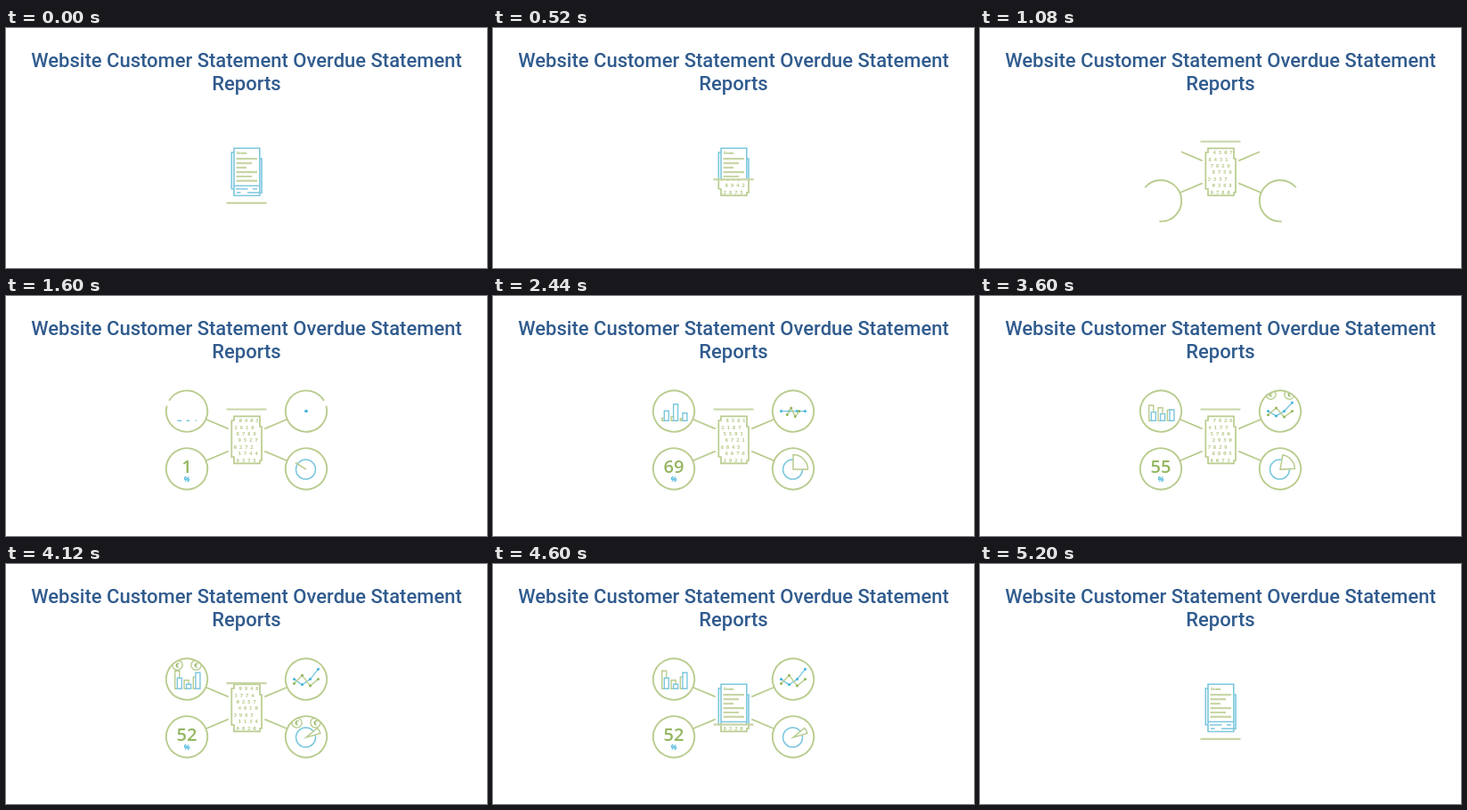
An HTML page with a canvas for the animation above (5.8 s loop, 540 by 270 pixels).

```html
<!DOCTYPE html>
<html lang="en">
<head>
<meta charset="utf-8">
<title>Overdue statement reports</title>
<style>
  html, body { margin: 0; width: 100%; height: 100%; overflow: hidden; background: #fff; }
  h1 {
    position: absolute; left: 0; top: 24px; width: 540px; margin: 0;
    font: 500 22px/26px Roboto, sans-serif; color: #305b8e;
    text-align: center; white-space: nowrap;
  }
  canvas { position: absolute; left: 0; top: 0; width: 540px; height: 270px; }
</style>
</head>
<body>
<canvas id="stage"></canvas>
<h1>Website Customer Statement Overdue Statement<br>Reports</h1>
<script>
const LOOP = 5800, STEP = 40, TAU = Math.PI * 2, RADIUS = 23.2;
const GREEN = '#b9cc8e', PALE = '#c8d6a6', LEAF = '#94b660', BLUE = '#7cc7de', DOT = '#45b4dc';
const canvas = document.getElementById('stage');
const ctx = canvas.getContext('2d');
const dpr = window.devicePixelRatio || 1;
canvas.width = 540 * dpr;
canvas.height = 270 * dpr;

// Timing helpers
const span = (t, from, to) => Math.min(1, Math.max(0, (t - from) / (to - from)));
const move = (t, from, to) => (1 - Math.cos(Math.PI * span(t, from, to))) / 2;
const easeOut = u => Math.sin(u * Math.PI / 2);
const mix = (a, b, u) => a + (b - a) * u;

function random(seed) {
  const v = Math.sin(seed * 12.9898) * 43758.5453;
  return v - Math.floor(v);
}

// Drawing helpers
function paint(color, width, fill) {
  if (fill) { ctx.fillStyle = fill; ctx.fill(); }
  ctx.strokeStyle = color;
  ctx.lineWidth = width;
  ctx.stroke();
}
function path(points, color, width, close, fill) {
  ctx.beginPath();
  points.forEach(([x, y]) => ctx.lineTo(x, y));
  if (close) ctx.closePath();
  paint(color, width, fill);
}
const hline = (x1, x2, y, color, width) => path([[x1, y], [x2, y]], color, width);

function ring(x, y, r, color, width, fill, from = 0, to = TAU) {
  ctx.beginPath();
  ctx.arc(x, y, r, from, to);
  paint(color, width, fill);
}
function label(text, x, y, font, color) {
  ctx.font = font;
  ctx.fillStyle = color;
  ctx.textAlign = 'center';
  ctx.fillText(text, x, y);
}
function band(top, bottom, draw) {
  ctx.save();
  ctx.beginPath();
  ctx.rect(240, top, 60, bottom - top);
  ctx.clip();
  draw();
  ctx.restore();
}

// Document as paper
function paper() {
  path([[256, 140], [253.3, 140], [253.3, 181], [256, 181]], BLUE, 1.6);
  path([[285, 147], [287, 147], [287, 185.5], [285, 185.5]], BLUE, 1.6);
  path([[256, 135.2], [284.8, 135.2], [284.8, 188.5], [256, 188.5]], BLUE, 1.6, true, '#fff');
  label('Details', 264.8, 142, '700 3.6px Roboto, sans-serif', LEAF);
  for (let i = 0; i < 6; i++) hline(258.5, 282 - 6 * (i % 5 % 3), 147.2 + i * 4.95, PALE, 2.2);
  hline(256, 285, 177.6, BLUE, 1.5);
  hline(258, 271.5, 181, BLUE, 1.6);
  hline(277, 282, 181, BLUE, 1.6);
  hline(259, 263.5, 185.2, BLUE, 1.6);
  hline(271, 285, 185.2, BLUE, 1.6);
}

// Document as data
function data(t) {
  const tick = Math.floor(t / 80);
  path([[256, 135.3], [285, 135.3], [285, 147], [287, 147], [287, 185], [285, 185],
    [285, 188.3], [256, 188.3], [256, 181], [253.3, 181], [253.3, 140], [256, 140]], GREEN, 1.7, true);
  for (let row = 0; row < 7; row++) {
    const x = 260.3 - 3 * Math.cos(2.35 * (row - 4));
    for (let col = 0; col < 4; col++) {
      label(Math.floor(10 * random(tick * 31 + row * 4 + col + 1)), x + col * 6.2, 142.2 + row * 7.4,
        '700 6px "Noto Sans Mono", monospace', GREEN);
    }
  }
}

// Bubble contents, drawn around the bubble centre
const BARS = { blue: [11, 18.5, 8.5], green: [14, 21, 11], blueEnd: [12, 5, 18], greenEnd: [20, 9.5, 13] };

function bars(t) {
  const swap = move(t, 3040, 4080);
  const rise = move(t, 1660, 2440) * (1 - 0.4 * move(t, 2440, 3040));
  const bar = (x, w, h, color) =>
    path([[x, 10.7], [x, 10.7 - h], [x + w, 10.7 - h], [x + w, 10.7]], color, 1.4, true, '#fff');
  for (let i = 0; i < 3; i++) {
    const x = -13.3 + i * 10.3;
    const green = mix(BARS.green[i] * move(t, 2200, 3000), BARS.greenEnd[i], swap);
    const width = 5 * span(t, 1440 + i * 60, 1560 + i * 80);
    if (green > 0) bar(x, 5, green, GREEN);
    if (width > 0) bar(x + 2.6, width, mix(BARS.blue[i] * rise, BARS.blueEnd[i], swap), BLUE);
  }
}

function lines(t) {
  const stretch = 1 + 0.25 * move(t, 3400, 4000);
  const plot = (heights, spread, lift, color, mark) => {
    const points = heights.map((y, i) => [(i * 9 - 13.5) * spread, y * lift * stretch]);
    path(points, color, 1.4);
    points.forEach(([x, y]) => ring(x, y, 0.9, mark, 1.2, mark));
  };
  if (t >= 1480) plot([0, 5, 0, -9], move(t, 1640, 2320), move(t, 2440, 2960), BLUE, DOT);
  if (t >= 2160) plot([4, -3.5, 6, 0], move(t, 2200, 2680), move(t, 2160, 2440), GREEN, LEAF);
}

function percent(t) {
  if (t < 1480) return;
  const value = 73 * span(t, 1588, 2490) - 21 * span(t, 3080, 3680);
  label(Math.round(value), 0, 4.6, '600 20px "Open Sans", sans-serif', LEAF);
  label('%', 0, 14.3, 'italic 700 8px "Open Sans", sans-serif', DOT);
}

function pie(t) {
  const size = easeOut(span(t, 1320, 1560));
  if (!size) return;
  ring(-0.5, 0.7, 11 * size, BLUE, 1.5);
  if (t < 1400) return;
  const sweep = easeOut(span(t, 1360, 1960)), swap = move(t, 3400, 4080);
  const from = -140 * (1 - sweep) + 50 * swap;
  const to = from + 90 * move(t, 1960, 2400) - 66 * swap;
  const rad = degrees => (degrees - 90) * Math.PI / 180;
  ctx.beginPath();
  ctx.moveTo(0, 0.7);
  ctx.arc(0, 0.7, 11 + 5.5 * sweep, rad(from), rad(to));
  ctx.closePath();
  paint(GREEN, 1.5, '#fff');
}

function coins(t, start) {
  const u = span(t, start, start + 700);
  if (u <= 0 || u >= 1) return;
  ctx.save();
  ctx.beginPath();
  ctx.arc(0, 0, RADIUS, 0, TAU);
  ctx.clip();
  for (const side of [-1, 1]) {
    ctx.save();
    ctx.translate(side * 10.5, -30 + 60 * u * u);
    ctx.rotate(0.2);
    ring(0, 0, 5.6, GREEN, 1.4, '#fff');
    label('€', 0, 2.7, '700 7.5px "Open Sans", sans-serif', LEAF);
    ctx.restore();
  }
  ctx.restore();
}

// side: -1 left, 1 right; level: -1 top, 1 bottom
const BUBBLES = [
  { draw: bars, side: -1, level: -1, coin: 3780, leave: 4640 },
  { draw: lines, side: 1, level: -1, coin: 3300, leave: 4800 },
  { draw: percent, side: -1, level: 1, coin: 2820, leave: 4800 },
  { draw: pie, side: 1, level: 1, coin: 3780, leave: 4800 }
];

function bubble({ draw, side, level, coin, leave }, t) {
  const start = 800 - 120 * level, linked = start + 170, closed = start + 740 - 60 * level;
  const x = 270 + side * 67, y = 162 + level * 32.4;
  const inner = [270 + side * 20.3, 162 + level * 12.6];
  const outer = [270 + side * 45.5, 162 + level * 23.3];

  const reach = span(t, start, linked) * (1 - span(t, leave + 160, leave + 380));
  if (reach > 0) path([inner, inner.map((v, i) => mix(v, outer[i], reach))], GREEN, 1.7);

  const drawn = easeOut(span(t, linked, closed));
  const u = span(t, leave, leave + 400);
  const scale = 1 + 3.8 * u * u - 4.8 * u * u * u;
  if (!drawn || scale < 0.01) return;
  ctx.save();
  ctx.translate(x, y);
  ctx.scale(scale, scale);
  draw(t);
  coins(t, coin);
  const mid = Math.atan2(outer[1] - y, outer[0] - x);
  ring(0, 0, RADIUS, GREEN, 1.9, null, mid - Math.PI * drawn, mid + Math.PI * drawn);
  ctx.restore();
}

function render(t) {
  ctx.setTransform(dpr, 0, 0, dpr, 0, 0);
  ctx.clearRect(0, 0, 540, 270);
  const scan = 196.8 - 69.3 * (move(t, 80, 1120) - move(t, 3920, 4920));
  band(120, scan, paper);
  band(scan, 210, () => data(t));
  if (t < 5200) BUBBLES.forEach(b => bubble(b, t));
  hline(247.5, 292.5, scan, PALE, 2.2);
}

const begin = performance.now();
function frame() {
  const t = (performance.now() - begin) % LOOP;
  render(Math.floor(t / STEP) * STEP);
  requestAnimationFrame(frame);
}
frame();
</script>
</body>
</html>
```
